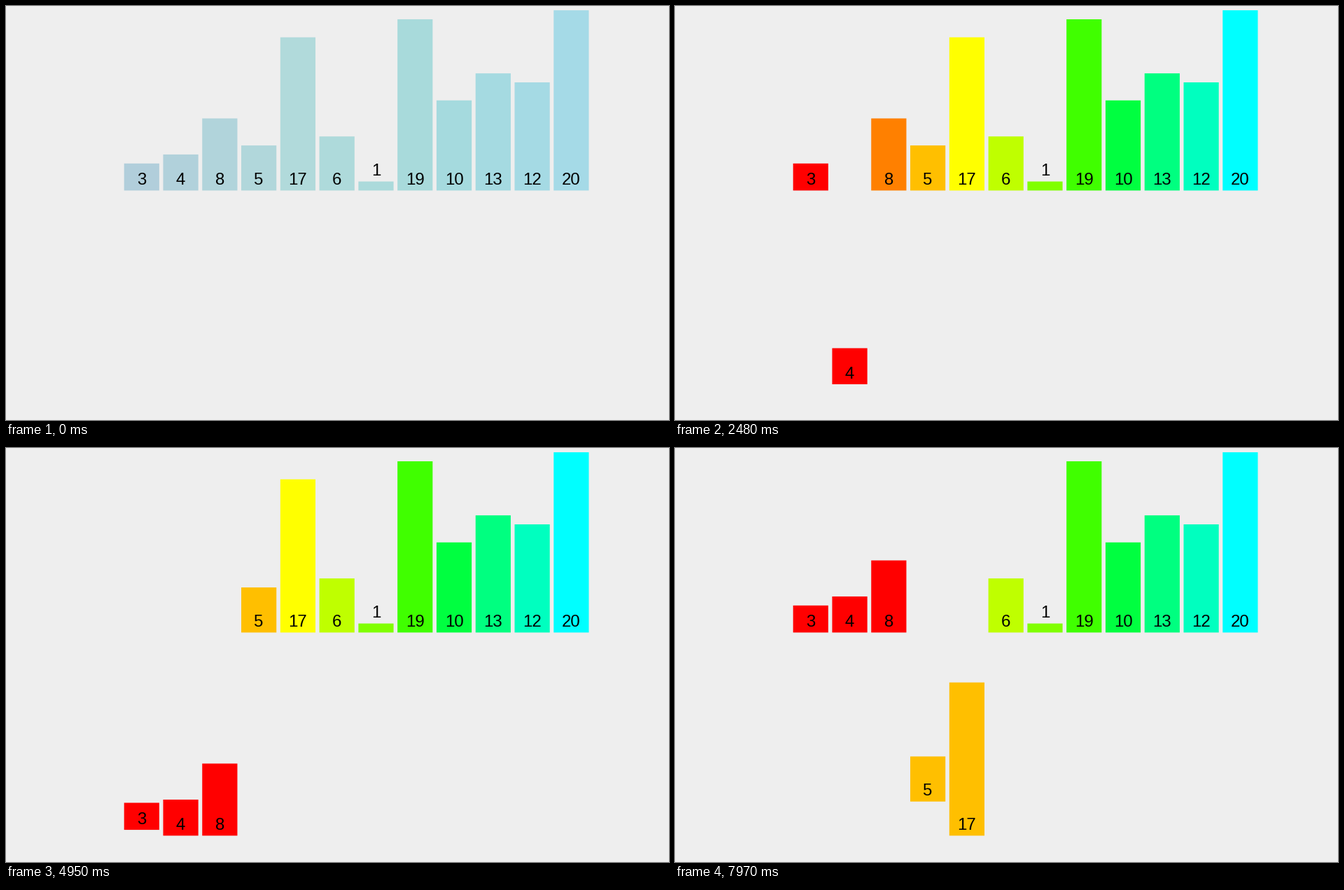
These frames come from a looping animation (947 by 591 pixels, 8000 ms). A matplotlib script:

```python
import colorsys

import matplotlib.pyplot as plt
import numpy as np
from matplotlib.animation import FuncAnimation
from matplotlib.patches import Rectangle

W, H, DPI = 947, 591, 64
LOOP, INTERVAL = 8000, 20
TICK = 77.3      # ms between visible updates
EASE_MS = 250

VALUES = [3, 4, 8, 5, 17, 6, 1, 19, 10, 13, 12, 20]
LEFT, STEP, BAR_W = 168.7, 55.78, 50.2
BASE, UNIT, DROP = 263.4, 12.865, 290
FONT_PX = 24

START = np.array([173, 216, 230]) / 255


def rainbow(i):
    hue = 15 * (i if i < 8 else i + 1)
    return np.array(colorsys.hsv_to_rgb(hue / 360, 1, 1))


def pale(i):
    return np.minimum(1, 0.6 + 0.8 * rainbow(i))


# Merge sort steps: start in ms, action, bars, first bar of the merged run
STEPS = [
    (-57, "tint", range(12), 0),
    (425, "compare", (0, 1), 0),
    (785, "down", (0,), 0),
    (1429, "down", (1,), 0),
    (1905, "up", (0,), 0),
    (2417, "up", (1,), 0),
    (2887, "compare", (0, 2), 0),
    (3403, "down", (0,), 0),
    (3403, "compare_next", (1,), 0),
    (3914, "down", (1,), 0),
    (4380, "down", (2,), 0),
    (4899, "up", (0,), 0),
    (5380, "up", (1,), 0),
    (5878, "up", (2,), 0),
    (6366, "compare", (3, 4), 3),
    (6882, "down", (3,), 3),
    (7383, "down", (4,), 3),
    (7875, "up", (3,), 3),
]


def ease(t):
    t = min(max(t, 0), 1)
    return 4 * t**3 if t < 0.5 else 1 - 4 * (1 - t)**3


def visible_time(ms):
    tick = int(ms / TICK)
    # The picture freezes twice early on
    for first, last in ((8, 13), (13, 16)):
        if first < tick < last:
            tick = first
    return tick * TICK


def pose(time):
    colors = [START] * len(VALUES)
    drops = [0.0] * len(VALUES)
    for start, action, members, leader in STEPS:
        p = ease((time - start) / EASE_MS)
        if p == 0:
            continue
        for b in members:
            if action == "tint":
                goal = rainbow(b)
            elif action == "compare":
                goal = pale(b)
            elif action == "compare_next":
                goal = pale(leader)
            else:
                goal = rainbow(leader)
                end = DROP if action == "down" else 0
                drops[b] += (end - drops[b]) * p
            colors[b] = colors[b] + (goal - colors[b]) * p
    return colors, drops


fig = plt.figure(figsize=(W / DPI, H / DPI), dpi=DPI, facecolor="#eeeeee")
ax = fig.add_axes([0, 0, 1, 1])
ax.set_xlim(0, W)
ax.set_ylim(H, 0)
ax.axis("off")

bars, labels = [], []
for i, v in enumerate(VALUES):
    x = LEFT + i * STEP
    bar = Rectangle((x, BASE - v * UNIT), BAR_W, v * UNIT, linewidth=0, snap=False)
    bars.append(ax.add_patch(bar))
    labels.append(ax.text(x + BAR_W / 2, BASE, str(v), ha="center", va="baseline",
                          family="Liberation Sans", fontsize=FONT_PX * 72 / DPI,
                          color="black"))


def draw(frame):
    colors, drops = pose(visible_time((frame + 1) * INTERVAL))
    for v, bar, label, color, drop in zip(VALUES, bars, labels, colors, drops):
        bar.set_y(BASE - v * UNIT + drop)
        bar.set_facecolor(np.clip(color, 0, 1))
        # Labels sit above bars too short to hold them
        label.set_y(BASE + drop - (8.4 if v > 1 else 21.4))
    return bars + labels


anim = FuncAnimation(fig, draw, frames=LOOP // INTERVAL, interval=INTERVAL,
                     repeat=True, repeat_delay=0, blit=False)
plt.show()
```
